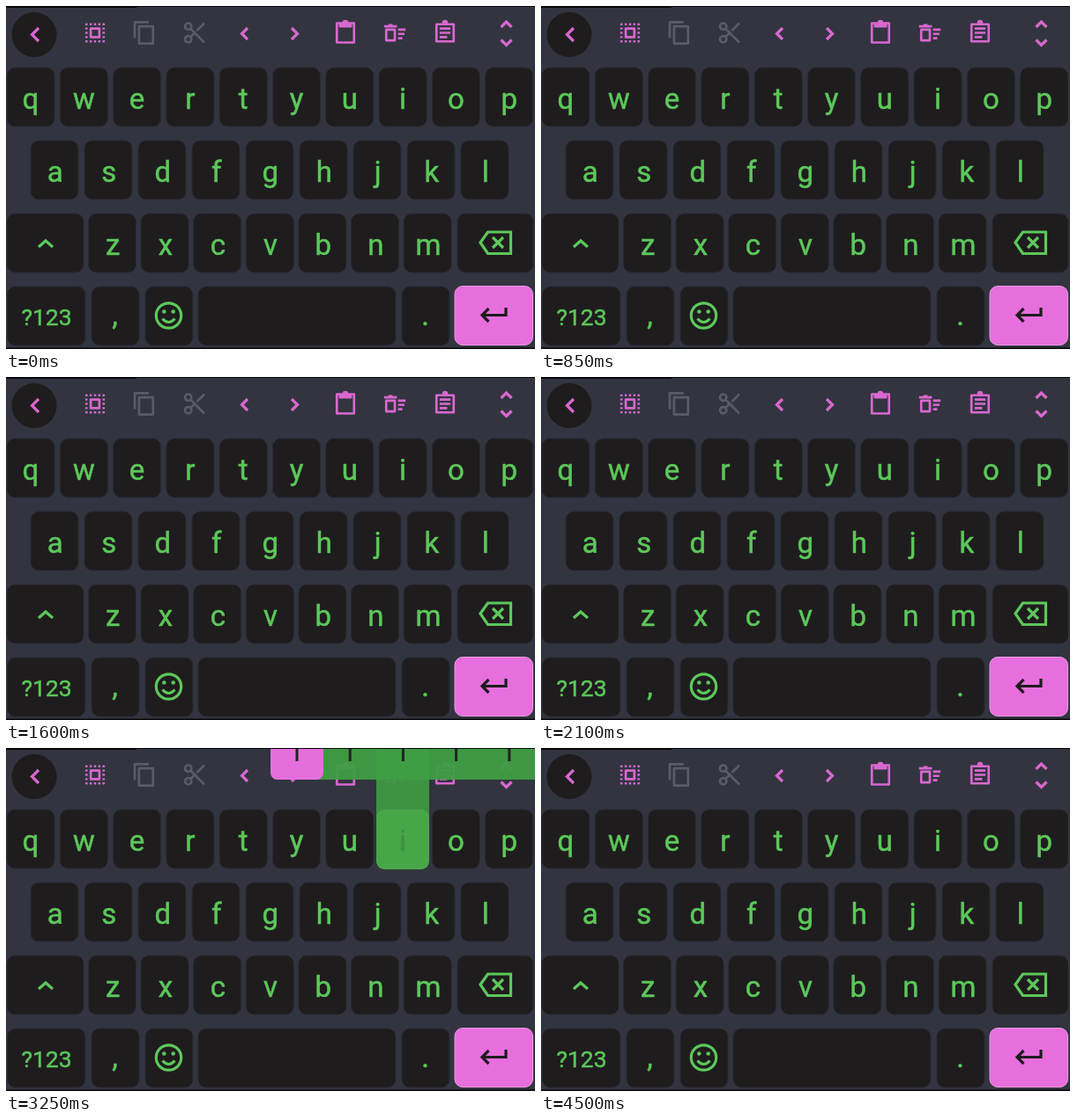
Animation, 600 px wide and 390 px high, one loop 5000 ms. Source, as an HTML page:

```html
<!DOCTYPE html>
<html lang="en">
<head>
<meta charset="utf-8">
<title>Keyboard</title>
<style>
  html, body { margin: 0; width: 100%; height: 100%; overflow: hidden; background: #32343f; }
  svg { display: block; width: 600px; height: 390px; }
  text { font-family: Roboto, sans-serif; text-anchor: middle; stroke-width: .5; }
  .line { fill: none; stroke-width: 3.2; }
  .icon { fill: none; stroke-width: 2.2; stroke-linejoin: round; }
  .soft { filter: blur(.4px); }
</style>
</head>
<body>
<svg id="stage" viewBox="0 0 600 390"></svg>
<script>
const GREEN = '#5cc85a', PINK = '#d868cf', GREY = '#5a5b66', KEY = '#1f1c1e', INK = '#202420';
const LOOP = 5000;

const rect = (x, y, w, h, fill, r = 0, stroke = 'none') =>
  `<rect x="${x}" y="${y}" width="${w}" height="${h}" rx="${r}" fill="${fill}" stroke="${stroke}"/>`;
const label = (s, x, y, size = 33, fill = GREEN) =>
  `<text x="${x}" y="${y}" font-size="${size}" fill="${fill}" stroke="${fill}">${s}</text>`;
const line = (d, color) => `<path class="line" d="${d}" stroke="${color}"/>`;
const key = (x, y, w, fill = KEY, edge = '#292a32') => rect(x, y, w, 67, fill, 9, edge);
const row = (letters, x, y, pitch, baseline, shift = 0) => [...letters].map((c, i) =>
  key(x + i * pitch, y, 54) + label(c, x + 27 + shift + i * pitch, baseline)).join('');

// Toolbar icons live on a 24-unit grid centred on (x, 30.5).
const icon = (x, body, color = PINK) =>
  `<g class="icon" stroke="${color}" transform="translate(${x} 30.5) scale(1.22) translate(-12 -12)">${body}</g>`;
const path = d => `<path d="${d}"/>`;
const board = path('M4 3h16v18H4z');
const clip = color => `<circle cx="12" cy="2.6" r="1.6" fill="${color}"/>`;

const toolbar =
  `<circle cx="32" cy="32.5" r="25.5" fill="${KEY}"/>` +
  line('M37 25l-7.5 7.5 7.5 7.5', PINK) +
  icon(101, '<rect x="4" y="4" width="16" height="16" stroke-dasharray="2" stroke-dashoffset="1"/>' +
    '<rect x="8" y="8" width="8" height="8"/>') +
  icon(157, path('M3 17V2h13M7 6h13v16H7z'), GREY) +
  icon(214, '<circle cx="6" cy="6" r="3"/><circle cx="6" cy="18" r="3"/>' +
    path('M8 8l13 13M8 16l5-5M14 10l7-7'), GREY) +
  line('M274 25l-6.5 6.5 6.5 6.5M324 25l6.5 6.5-6.5 6.5', PINK) +
  icon(385, board + path('M7 4h10v2H7z') + clip(PINK)) +
  icon(441, path('M4 9h8v10H4zM2 6h12M6 5h4M15 9h7M15 13h6M15 17h4')) +
  icon(498, path('M4 4h16v16H4zM7 8h10M7 12h10M7 16h7') + clip(PINK)) +
  line('M561.5 24l6-6 6 6M561.5 38.5l6 6 6-6', PINK);

const keys =
  row('qwertyuiop', 1, 70, 60.3, 117) +
  row('asdfghjkl', 28, 153, 61, 200, .8) +
  row('zxcvbnm', 93.5, 236, 59.6, 283, .8) +
  key(1, 236, 87) + line('M37 274l8-7 8 7', GREEN) +
  key(512, 236, 86) +
  line('M538 269l8.5-12h26v24.5h-26zM552 263l12 12M564 263l-12 12', GREEN) +
  key(1.5, 319, 88.5) + label('?123', 46, 363, 26.5) +
  key(97, 319, 54) + label(',', 123.5, 363) +
  key(158, 319, 54) +
  `<circle class="line" cx="184.5" cy="352" r="14.2" stroke="${GREEN}"/>` +
  `<g fill="${GREEN}"><circle cx="179.3" cy="347.5" r="2.3"/><circle cx="189.7" cy="347.5" r="2.3"/></g>` +
  line('M177.5 355.5q7 8 14 0', GREEN) +
  key(218, 319, 224) +
  key(449, 319, 54) + label('.', 475.5, 363) +
  key(509, 318.5, 88.5, '#e76fdd', '#eb9ce4') +
  line('M567 343v8.5h-27M547.5 344l-7.5 7.5 7.5 7.5', KEY);

const pressed = (c, x) =>
  `<g opacity=".95">${rect(x, 0, 60, 80, '#409944')}${rect(x, 70, 60, 68, '#4aae4a', 9)}</g>` +
  label(c, x + 30, 117, 33, '#3d923f');
const preview = (c, x) =>
  pressed(c, x) + label(c, x + 30, 16, 33, INK) +
  [0, 5.5, 11].map(d => rect(x + 42 + d, 52, 3.2, 3.2, INK)).join('');
const choices = selected =>
  pressed('i', 420) +
  `<g opacity=".95"><path d="M300 0h300v36H309q-9 0-9-9z" fill="#409f44"/></g>` +
  rect(300 + selected * 60, -12, 60, 48, '#e56edb', 8) +
  [0, 1, 2, 3, 4].map(i => rect(328.5 + i * 60.2, 0, 3, 15, INK)).join('');

const states = [
  [0, ''],
  [1000, preview('e', 118.5)],
  [1400, ''],
  [2200, preview('i', 420)],
  [2500, choices(2)],
  [2900, choices(1)],
  [3100, choices(0)],
  [3950, '']
];

const stage = document.getElementById('stage');
stage.innerHTML = rect(0, 0, 600, 390, '#32343f') +
  `<g class="soft">${toolbar}${keys}<g id="popup"></g></g>` +
  rect(0, 0, 600, 1, '#08080a') + rect(0, 0, 148, 2, '#08080a') + rect(0, 388.5, 600, 1.5, '#08080a');
const popup = document.getElementById('popup');
let shown = '';

function draw() {
  const t = performance.now() % LOOP;
  const markup = states.findLast(([start]) => start <= t)[1];
  if (markup !== shown) popup.innerHTML = shown = markup;
  requestAnimationFrame(draw);
}
draw();
</script>
</body>
</html>
```
